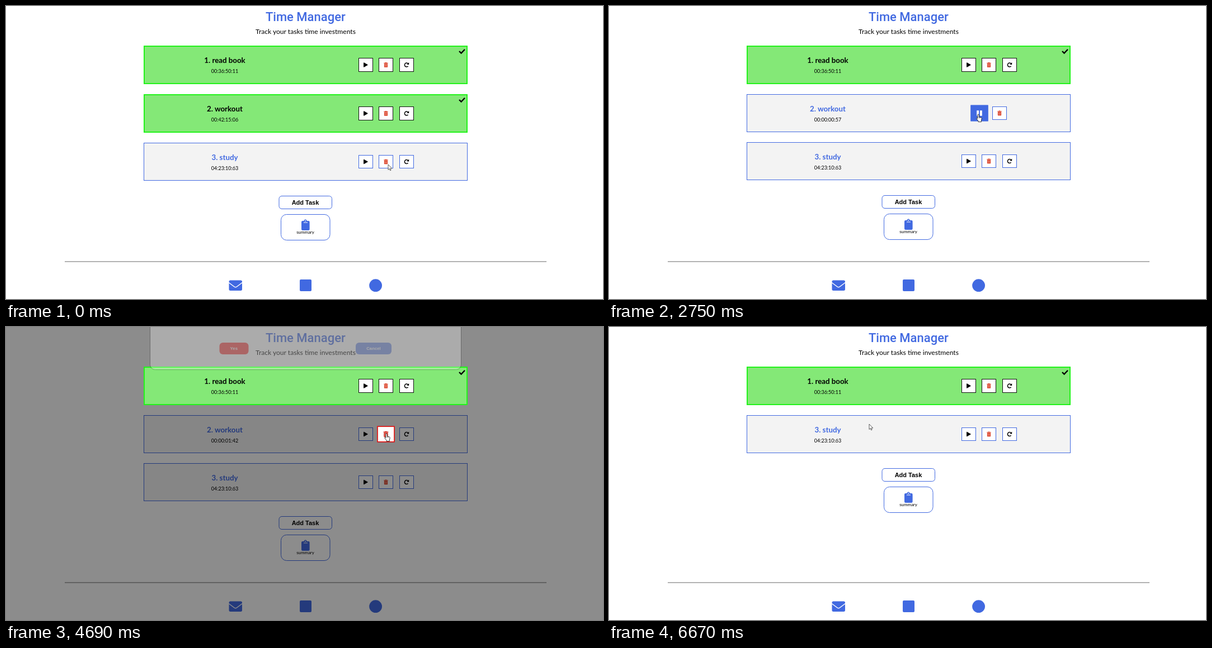
An HTML page that plays this animation: 1067 by 525 pixels, repeating every 6.7 s.

```html
<!DOCTYPE html>
<html lang="en">
<head>
<meta charset="utf-8">
<title>Time Manager</title>
<style>
  html, body { margin: 0; width: 100%; height: 100%; overflow: hidden; background: #fff; }
  svg { display: block; width: 100vw; height: 100vh; }
  text { text-anchor: middle; font-family: Lato, sans-serif; font-size: 12.1px; }
  .head { font: 500 22px Roboto, sans-serif; fill: #4169e1; }
  .name { font-size: 13.3px; font-weight: 700; }
  .time { font-size: 9px; }
  .add { font: 700 11px "Liberation Sans", Arial, sans-serif; }
  .small { font-size: 7.9px; }
  .choice { font: 700 7.8px "Liberation Sans", Arial, sans-serif; fill: #fff; }
</style>
</head>
<body>
<svg id="stage" viewBox="0 0 1067 525" preserveAspectRatio="none"></svg>
<script>
const LOOP = 6700;
const BLUE = '#4169e1', RED = '#e8160c', TRASH = '#d93a20';
const stage = document.getElementById('stage');

// Moments of the story, in ms
const RESET = 1140, RUN = 2180, PAUSE = 3500, ASK = 4650, DELETED = 6020;
const clicks = [[1040, RESET], [2100, RUN], [3420, PAUSE], [4550, ASK], [5900, DELETED]];
const overLink = [[345, RESET], [1590, 1670], [1705, PAUSE], [4020, 5270], [5665, DELETED]];
// start, end, from x, y, to x, y
const moves = [
  [30, 420, 683, 284, 715, 195],
  [1590, 1760, 706, 195, 660, 194],
  [3990, 4150, 660, 194, 680, 191],
  [5230, 5730, 680, 191, 410, 136],
  [6450, 6670, 410, 137, 465, 174]
];

const clamp = v => Math.max(0, Math.min(1, v));
const smooth = v => v * v * (3 - 2 * v);
const within = (t, spans) => spans.some(([a, b]) => t >= a && t < b);

// Hover amount with a 200 ms transition each way
function hover(t, on, off) {
  const up = clamp((t - on) / 200);
  if (t < off) return smooth(up);
  return smooth(clamp(clamp((off - on) / 200) - (t - off) / 200));
}

const rect = (x, y, w, h, fill, stroke = 'none', sw = 1, r = 0) =>
  `<rect x="${x}" y="${y}" width="${w}" height="${h}" rx="${r}" fill="${fill}" stroke="${stroke}" stroke-width="${sw}"/>`;
const text = (s, x, y, cls = '', fill = '') =>
  `<text x="${x}" y="${y}" class="${cls}"${fill && ` fill="${fill}"`}>${s}</text>`;
const group = (x, y, body, scale = 1, alpha = 1) =>
  `<g transform="translate(${x} ${y}) scale(${scale})" opacity="${alpha}">${body}</g>`;

const icons = {
  play: c => `<path d="M-3.4-3.8L3.3 0L-3.4 3.8Z" fill="${c}" stroke="${c}" stroke-linejoin="round"/>`,
  pause: c => rect(-4, -4, 3.2, 8, c) + rect(.8, -4, 3.2, 8, c),
  trash: c => `<path d="M-3.6-3.7h2.2l.6-.7h1.6l.6.7h2.2v1.1h-7.2zM-3.1-2.1h6.2v5.5q0 .9-.9.9h-4.4q-.9 0-.9-.9z" fill="${c}"/>` +
    '<path d="M-1.5-.9v4M0-.9v4M1.5-.9v4" stroke="#fff" stroke-width=".6" opacity=".7"/>',
  redo: c => `<path d="M2.6 2.3A3.5 3.5 0 1 1 2.6-2.2" fill="none" stroke="${c}" stroke-width="1.5"/>` +
    `<path d="M4.2-4.4V-.6H.4Z" fill="${c}"/>`
};

function button(icon, x, y, done, h = 0) {
  const del = icon === 'trash', half = done ? 12 : 11.5;
  const box = (fill, stroke, sw) => rect(-12.5, -half, 25, half * 2, fill, stroke, sw);
  let body = box('#fff', done ? '#111' : BLUE, 1) + icons[icon](del ? TRASH : '#000');
  if (h > 0) {
    body += group(0, 0, del ? box('#fff', RED, 1.4) + icons.trash('#d3261a')
      : box(BLUE, BLUE, 1) + icons[icon]('#fff'), 1, h);
  }
  return group(x, y, body, 1 + .2 * h);
}

// One task row; `skip` leaves out a button that is drawn elsewhere
function card(name, time, y, done, { redo = true, running = false, hov = {}, skip = '' } = {}) {
  const h = done ? 69 : 68, cy = y + h / 2;
  const xs = redo ? [643, 679, 716] : [662, 698];
  let out = done ? rect(247, y + 1, 577, h - 2, '#84e877', '#22f31b', 2)
    : rect(246.5, y + .5, 578, h - 1, '#f3f3f3', BLUE);
  out += text(name, 391, y + 30.5, 'name', done ? '#000' : BLUE) + text(time, 391, y + 49, 'time');
  if (done) out += `<path d="M810 ${y + 10}l3.6 3.6l6.4-6.8" fill="none" stroke="#000" stroke-width="2.4"/>`;
  ['play', 'trash', 'redo'].slice(0, xs.length).forEach((k, i) => {
    if (k !== skip) out += button(k === 'play' && running ? 'pause' : k, xs[i], cy, done, hov[k]);
  });
  return out;
}

const header = text('Time Manager', 535.3, 27, 'head') +
  text('Track your tasks time investments', 535.5, 50);

const actions = rect(488, 340.5, 94.5, 23, '#fff', BLUE, 1, 5) +
  text('Add Task', 535, 355.7, 'add') +
  rect(491.5, 373.5, 87.5, 46, '#fff', BLUE, 1, 10) +
  `<path d="M530 385h2.6a2.5 2.5 0 0 1 5 0h3a2 2 0 0 1 2 2v13a2 2 0 0 1-2 2h-10.600a2 2 0 0 1-2-2v-13a2 2 0 0 1 2-2z" fill="${BLUE}"/>` +
  '<path d="M532 388h7" stroke="#fff"/><circle cx="535.1" cy="385" r=".9" fill="#fff"/>' +
  text('summary', 535, 408.4, 'small');

const footer = rect(105, 457.5, 861, 1, '#666') +
  rect(398.500, 491.5, 23.500, 18.5, BLUE, 'none', 1, 2.5) +
  '<path d="M398 495.500l10 7.500q2.200 1.600 4.400 0l10-7.500" fill="none" stroke="#fff" stroke-width="1.5"/>' +
  rect(525, 490, 21, 21, BLUE, 'none', 1, 2) +
  `<circle cx="660.6" cy="500.7" r="11.4" fill="${BLUE}"/>`;

const dialog = rect(257.5, 42.5, 556, 128, '#fff', '#111', 1, 9) +
  text('Are you sure you want to delete this task?', 535, 82) +
  rect(381.5, 122, 52, 21, '#f00', 'none', 1, 6) + text('Yes', 407.3, 135.2, 'choice') +
  rect(625, 122, 64, 21, BLUE, 'none', 1, 6) + text('Cancel', 657, 135.2, 'choice');

const hand = '<path d="M-1.2 1.2C-1.2-.4 1.2-.4 1.2 1.200V4.800L5.200 5.900Q6.400 6.400 6.200 7.800L5.400 11V13.600H0V12L-3 8.200C-3.700 6.900-2.400 6.300-1.200 7.600Z" fill="#fff" stroke="#222" stroke-width=".9" stroke-linejoin="round"/>' +
  '<path d="M1.200 5v2.200M3 5.500v2" stroke="#222" stroke-width=".6"/>';
const arrow = '<path d="M0 0V9.500L2.200 7.600L3.600 10.800L5.100 10.100L3.700 7H6.800Z" fill="#fff" stroke="#333" stroke-width=".8"/>';

function pointer(t) {
  const m = moves.filter(v => t >= v[0]).pop() || moves[0];
  const [a, b, x0, y0, x1, y1] = m, k = smooth(clamp((t - a) / (b - a)));
  const x = x0 + (x1 - x0) * k, y = y0 + (y1 - y0) * k;
  const ring = within(t, clicks) ? '<circle r="7" fill="#ffd800" opacity=".6"/>' : '';
  return group(x, y, ring + (within(t, overLink) ? hand : arrow));
}

function workoutTime(t) {
  if (t < RESET) return '00:42:15:06';
  const n = t < 2780 ? Math.min(57, (t - RUN) / 10) : 57 + (t - 2750) * 85 / 750;
  const cs = Math.floor(Math.max(0, Math.min(142, n)));
  return `00:00:0${Math.floor(cs / 100)}:${String(cs % 100).padStart(2, '0')}`;
}

function scene(t) {
  const done = t < RESET, gone = t >= DELETED;
  const asking = t >= ASK && !gone;
  const redo = done || t >= PAUSE;
  const hov = {
    play: hover(t, 1690, PAUSE),
    trash: t < 3900 ? hover(t, 1590, 1670) : hover(t, 4010, 5265),
    redo: done ? hover(t, 345, RESET) : 0
  };
  const raised = asking && hov.trash > 0;
  let out = header;
  if (!gone) {
    out += card('2. workout', workoutTime(t), 158, done,
      { redo, running: t >= RUN && t < PAUSE, hov, skip: raised ? 'trash' : '' });
  }
  out += card('3. study', '04:23:10:63', gone ? 158 : done ? 245 : 244, false);
  out += group(0, gone ? -87 : done ? 0 : -1, actions) + footer;
  if (asking) out += rect(0, 0, 1067, 525, 'rgba(0,0,0,.45)');
  out += card('1. read book', '00:36:50:11', 71, true);
  if (raised) out += button('trash', 679, 192, false, hov.trash);
  if (asking) {
    const left = Math.pow(1 - clamp((t - ASK) / 410), 3);
    out += group(0, -129 * left, dialog, 1, 1 - left);
  }
  return out + pointer(t);
}

const start = performance.now();
function tick() {
  stage.innerHTML = scene((performance.now() - start) % LOOP);
  requestAnimationFrame(tick);
}
tick();
</script>
</body>
</html>
```
